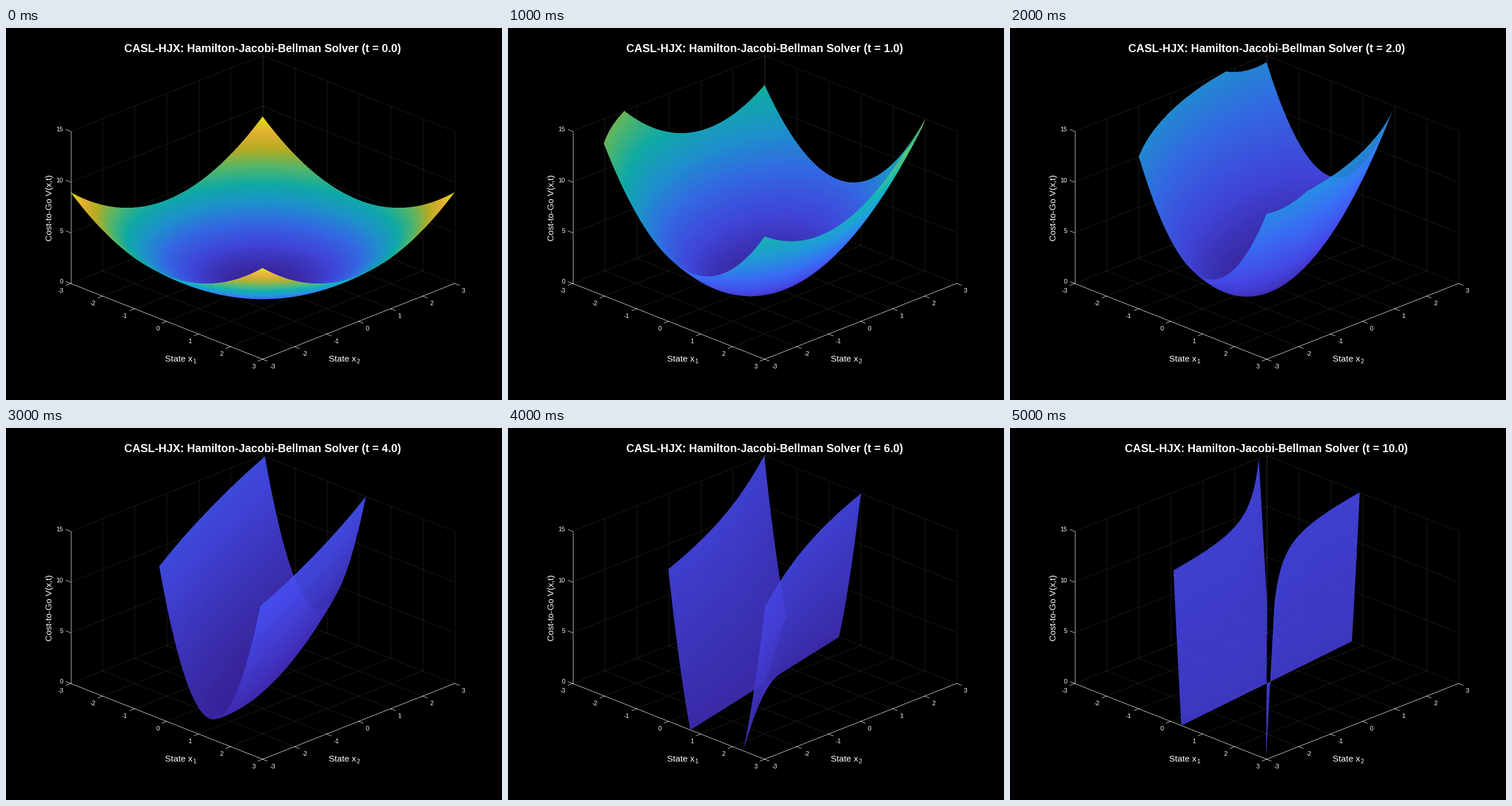
A matplotlib script that plays this animation: 864x648 px, repeating every 6000 ms.

```python
import numpy as np
import matplotlib.pyplot as plt
from matplotlib.animation import FuncAnimation
from matplotlib.colors import LinearSegmentedColormap

W, H = 864, 648
CX, CY = 447.0, 445.0             # screen position of the state-space centre
UX, UY, UZ = 55.75, 22.0, 17.667  # pixels per unit
LIM, ZMAX, ALPHA = 3.0, 15.0, 0.9
X0, X1, Y0, Y1, SS = 108, 788, 40, 584, 2
TIMES = [0, 1, 2, 4, 6, 10]

CMAP = LinearSegmentedColormap.from_list("cost", [
    "#3e26a8", "#484cf0", "#3a74fe", "#21a3e3", "#12beb9",
    "#5ccc76", "#c8c129", "#fec438", "#f9fb15"])


def project(x1, x2, z=0.0):
    return CX + UX * (x1 + x2), CY + UY * (x1 - x2) - UZ * z


def cost_form(t):
    """V = p d^2 + q s d + r s^2 with s = x1 + x2 and d = x1 - x2."""
    along = 1 + 1.2 * t + 0.34 * t * t       # V at (1, 1)
    across = 1 + 0.393 * t - 0.048 * t * t   # V at (1, -1)
    side = 0.5 + 0.2 * t - 0.0015 * t * t    # V at (0, 1)
    return across / 4, (along + across) / 4 - side, along / 4


def cost(s, d, form):
    p, q, r = form
    return p * d * d + q * s * d + r * s * s


def layer(s, d, form, lo, hi):
    """Colour and coverage of the surface where a sight line meets it."""
    v = cost(s, d, form)
    inside = abs(s) + abs(d) <= 2 * LIM
    hit = inside & (v >= 0) & (v <= ZMAX)
    rgb = CMAP(np.where(hit, (v - lo) / (hi - lo), 0))[..., :3]
    return rgb, (ALPHA * hit)[..., None]


def render(t):
    form = p, q, r = cost_form(t)
    g, h = np.meshgrid(*[np.linspace(-LIM, LIM, 121)] * 2)
    domain = cost(g + h, g - h, form)
    lo, hi = domain.min(), domain.max()

    px = X0 + (np.arange((X1 - X0) * SS) + 0.5) / SS
    py = Y0 + (np.arange((Y1 - Y0) * SS) + 0.5) / SS
    s, y = np.meshgrid((px - CX) / UX, py)
    # each sight line meets the surface at the roots of a quadratic in d
    qa = UZ * p
    qb = UZ * q * s - UY
    qc = UZ * r * s * s + y - CY
    with np.errstate(all="ignore"):
        m = -(qb + np.copysign(np.sqrt(qb * qb - 4 * qa * qc), qb)) / 2
        d1, d2 = m / qa, qc / m
        far, fa = layer(s, np.minimum(d1, d2), form, lo, hi)
        near, na = layer(s, np.maximum(d1, d2), form, lo, hi)
    rgb = near * na + far * fa * (1 - na)
    alpha = na + fa * (1 - na)
    out = np.concatenate([rgb, alpha], axis=-1)
    out = out.reshape(Y1 - Y0, SS, X1 - X0, SS, 4).mean(axis=(1, 3))
    out[..., :3] /= np.maximum(out[..., 3:], 1e-6)
    return np.clip(out, 0, 1)


plt.rcParams["font.family"] = "Liberation Sans"
fig = plt.figure(figsize=(W / 72, H / 72), dpi=72, facecolor="black")
ax = fig.add_axes([0, 0, 1, 1])


def line(p, q, **kw):
    (xa, ya), (xb, yb) = p, q
    ax.plot([xa, xb], [ya, yb], **kw)


def text(x, y, label, size, **kw):
    return ax.text(x, y, label, fontsize=size, color="white", zorder=5,
                   va="baseline", **kw)


def draw_axes():
    grid = dict(color="white", alpha=0.13, lw=0.8, zorder=1)
    axis = dict(color="0.88", lw=0.8, zorder=2)
    for v in range(-3, 4):
        line(project(v, -3), project(v, 3), **grid)
        line(project(-3, v), project(3, v), **grid)
        line(project(-3, v), project(-3, v, ZMAX), **grid)
        line(project(v, 3), project(v, 3, ZMAX), **grid)
    for z in (5, 10, 15):
        line(project(-3, -3, z), project(-3, 3, z), **grid)
        line(project(-3, 3, z), project(3, 3, z), **grid)

    line(project(-3, -3), project(-3, -3, ZMAX), **axis)
    line(project(-3, -3), project(3, -3), **axis)
    line(project(3, -3), project(3, 3), **axis)

    tick = 0.145
    for v in range(-3, 4):
        line(project(v, -3), project(v, -3 - tick), **axis)
        line(project(3, v), project(3 + tick, v), **axis)
        x, y = project(v, -3)
        text(x - 12.5, y + 16, str(v), 11, ha="right")
        x, y = project(3, v)
        text(x + 12.5, y + 16, str(v), 11, ha="left")
    for z in (0, 5, 10, 15):
        line(project(-3, -3, z), project(-3 - tick, -3, z), **axis)
        x, y = project(-3, -3, z)
        text(x - 13, y + 0.3, str(z), 11, ha="right")

    for x, sub in ((277.3, "1"), (562.5, "2")):
        text(x, 581, "State x", 15.4)
        text(x + 48, 584, sub, 10.5)
    text(80, 371, "Cost-to-Go V(x,t)", 15.4, rotation=90,
         rotation_mode="anchor", ha="left")


draw_axes()
title = text(CX, 41.5, "", 19.5, weight="bold", ha="center")
images = [render(t) for t in TIMES]
surface = ax.imshow(images[0], extent=(X0, X1, Y1, Y0), zorder=3,
                    interpolation="nearest", aspect="auto")
ax.set_xlim(0, W)
ax.set_ylim(H, 0)
ax.axis("off")


def update(i):
    surface.set_data(images[i])
    title.set_text(f"CASL-HJX: Hamilton-Jacobi-Bellman Solver (t = {TIMES[i]:.1f})")
    return surface, title


anim = FuncAnimation(fig, update, frames=len(TIMES), interval=1000,
                     init_func=lambda: update(0), repeat=True, repeat_delay=0)
plt.show()
```
